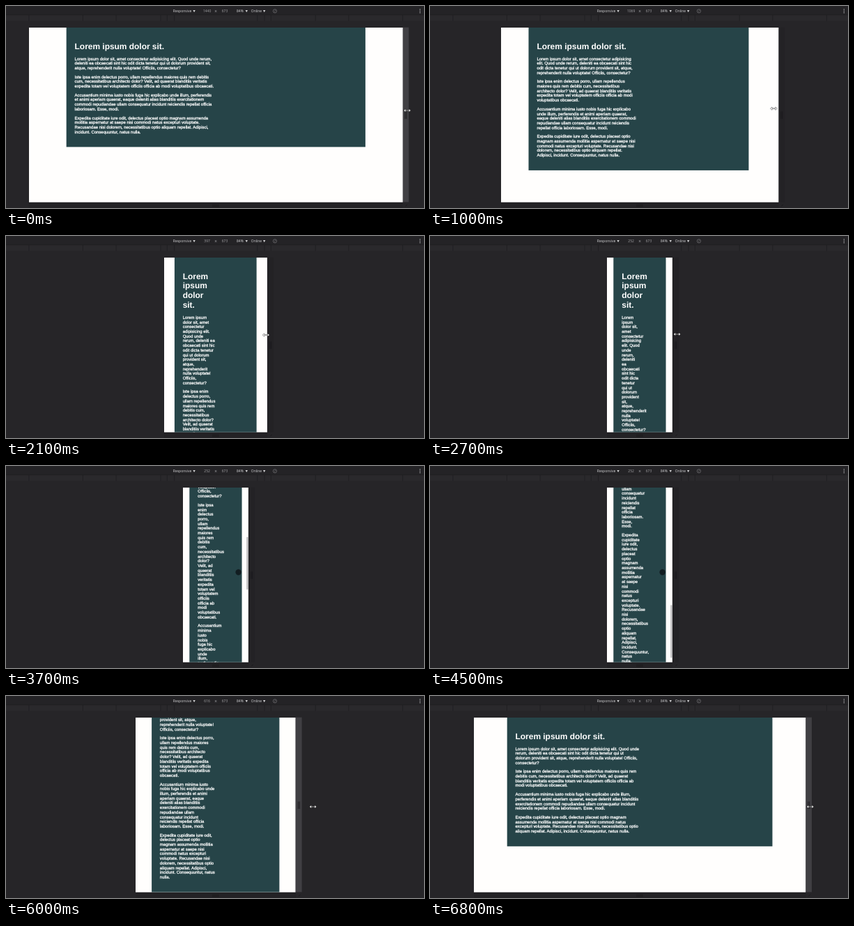
Write an HTML page that moves like this. It is 600 px wide and 290 px high and loops after 6.9 s.

```html
<!DOCTYPE html>
<html lang="en">
<head>
<meta charset="utf-8">
<title>Responsive page preview</title>
<style>
  html, body { margin: 0; width: 100%; height: 100%; overflow: hidden; background: #262528; }
  #stage { position: relative; width: 600px; height: 290px; overflow: hidden; }
  svg { position: absolute; left: 0; top: 0; }
  .bar text { font: 5px "Open Sans", "Noto Sans", sans-serif; fill: #d4d4d6; }
  .bar .dim { fill: #a2a2a5; text-anchor: middle; }
  #page {
    position: absolute; height: 673px; overflow: hidden;
    background: #fffefd; transform-origin: 0 0;
    text-rendering: geometricPrecision;
  }
  #card {
    box-sizing: border-box; padding: 32px;
    background: #264448; color: #fff;
    font: 16px/18px "Liberation Sans", Arial, sans-serif;
  }
  #copy { width: 50%; display: flow-root; }
  h1 { margin: 21.44px 0; font-size: 32px; line-height: 37px; }
  p { margin: 16px 0; -webkit-text-stroke: .7px #fff; }
</style>
</head>
<body>
<div id="stage">
  <svg class="bar" width="600" height="290">
    <rect width="600" height="13" fill="#242326"/>
    <rect y="13" width="600" height="8.5" fill="#2a292c"/>
    <path d="M0 12.8H600" stroke="#1d1c1f" stroke-width=".6"/>
    <path id="ticks" stroke="#1e1d20" stroke-width=".7"/>
    <text x="239.8" y="9.2">Responsive</text>
    <text class="dim" id="size" x="288.6" y="9.2"></text>
    <text class="dim" x="301" y="9.8" style="font-size:6.5px">×</text>
    <text class="dim" x="314" y="9.2">673</text>
    <text x="331" y="9.2">84%</text>
    <text x="351.8" y="9.2">Online</text>
    <path d="M268.4 6h3.4l-1.7 3zM343.6 6h3.4l-1.7 3zM369 6h3.4l-1.7 3z" fill="#d4d4d6"/>
    <g fill="none" stroke="#858588" stroke-width=".6">
      <circle cx="386" cy="7.3" r="2.6"/>
      <path d="M384.8 8.4l2.4-2.2"/>
    </g>
    <path d="M594.3 4.3v1.2m0 1.2v1.2m0 1.2v1.2" stroke="#b5b5b8" stroke-width="1.2"/>
    <rect id="foot" y="281.5" height="8.5" fill="#232225"/>
    <path d="M296 285.6h10m-10 2h10" stroke="#18171a" stroke-width=".8"/>
    <g id="handle">
      <rect id="grab" y="30.7" width="8.7" height="250.8"/>
      <path d="M3.4 151.5v10.5m2 0v-10.5M4 287.5l2.5-2.5" stroke="#18171a" stroke-width=".8"/>
    </g>
  </svg>

  <div id="page">
    <div id="card"><div id="copy">
      <h1>Lorem ipsum dolor sit.</h1>
      <p>Lorem ipsum dolor sit, amet consectetur adipisicing elit. Quod unde rerum, deleniti ea obcaecati sint hic odit dicta tenetur qui ut dolorum provident sit, atque, reprehenderit nulla voluptate! Officiis, consectetur?</p>
      <p>Iste ipsa enim delectus porro, ullam repellendus maiores quis rem debitis cum, necessitatibus architecto dolor? Velit, ad quaerat blanditiis veritatis expedita totam vel voluptatem officiis officia ab modi voluptatibus obcaecati.</p>
      <p>Accusantium minima iusto nobis fuga hic explicabo unde illum, perferendis et animi aperiam quaerat, eaque deleniti alias blanditiis exercitationem commodi repudiandae ullam consequatur incidunt reiciendis repellat officia laboriosam. Esse, modi.</p>
      <p>Expedita cupiditate iure odit, delectus placeat optio magnam assumenda mollitia aspernatur at saepe nisi commodi natus excepturi voluptate. Recusandae nisi dolorem, necessitatibus optio aliquam repellat. Adipisci, incidunt. Consequuntur, natus nulla.</p>
    </div></div>
  </div>

  <svg width="600" height="290">
    <rect id="thumb" x="345.4" width="2.1" rx="1" fill="#6e6e73"/>
    <circle id="touch" r="4.2" fill="#0c1014" fill-opacity=".74"/>
    <path id="arrows" d="M-5 0l2.6-2.2v1.7h4.8v-1.7l2.6 2.2l-2.6 2.2v-1.7h-4.8v1.7z"
          fill="#fff" stroke="#111" stroke-width=".4"/>
  </svg>
</div>

<script>
const LOOP = 6900, STEP = 100;
const SCALE = 0.3726, CENTER = 301.2, TOP = 30.7, VIEW = 673;
const WIDE = 1440, NARROW = 252, REGROWN = 1278;
const CURSOR_LEAD = 110;

const el = id => document.getElementById(id);
const [size, ticks, foot, handle, grab, page, card, thumb, touch, arrows] =
  ['size', 'ticks', 'foot', 'handle', 'grab', 'page', 'card', 'thumb', 'touch', 'arrows'].map(el);

// Eases 0 to 1 between two times; the last two set the speed at each end.
function ease(t, from, to, startSpeed = 0, endSpeed = 0) {
  const u = Math.min(1, Math.max(0, (t - from) / (to - from))), w = 1 - u;
  return u * u * (3 - 2 * u) + startSpeed * u * w * w - endSpeed * u * u * w;
}

const shrink = t => ease(t, 300, 2700, .73);
const widen = t => ease(t, 5300, 6800, 0, .82);
const widthAt = t => WIDE - (WIDE - NARROW) * shrink(t) + (REGROWN - NARROW) * widen(t);
const rightEdge = width => CENTER + width * SCALE / 2;

function layOut(width) {
  card.style.width = width * .8 + 'px';
  card.style.marginLeft = width * .1 + 'px';
  return card.offsetHeight;
}

ticks.setAttribute('d', [320, 375, 425, 768, 1024, 1440]
  .flatMap(w => [-w, w]).map(w => `M${rightEdge(w)} 13v8.5`).join(''));
page.style.top = TOP + 'px';
page.style.transform = `scale(${SCALE})`;
const scrollEnd = layOut(NARROW) - VIEW - 54;

function drawPage(t, width) {
  // While shrinking, the content reflows slightly ahead of its frame.
  const height = layOut(widthAt(t + 20 * (1 - shrink(t))));
  const flicks = .42 * ease(t, 3200, 3700) + .58 * ease(t, 3800, 4500);
  const scroll = Math.min(flicks * scrollEnd, Math.max(0, height - VIEW));
  page.style.width = width + 'px';
  page.style.left = CENTER - width * SCALE / 2 + 'px';
  card.style.transform = `translateY(${-scroll}px)`;
  thumb.setAttribute('y', TOP + scroll / height * VIEW * SCALE);
  thumb.setAttribute('height', VIEW / height * VIEW * SCALE);
  thumb.setAttribute('opacity', .5 * (ease(t, 3200, 3400) - ease(t, 4500, 5000)));
}

function drawFrame(t, width) {
  const right = rightEdge(width);
  size.textContent = width;
  foot.setAttribute('x', 2 * CENTER - right);
  foot.setAttribute('width', width * SCALE);
  handle.setAttribute('transform', `translate(${right} 0)`);
  grab.setAttribute('fill', t < 500 || t > 5200 ? '#403f43' : '#232225');
}

function drawCursor(t, width) {
  const reach = ease(t, 2800, 3300), release = ease(t, 4500, 5200);
  const x = rightEdge(widthAt(t + CURSOR_LEAD)) + 6.5 - 21 * (reach - release);
  const y = 150 - 9 * shrink(t) + 11.5 * reach + 6.5 * release;
  const touching = reach > release && x < rightEdge(width);
  for (const [node, shown] of [[touch, touching], [arrows, !touching]]) {
    node.setAttribute('transform', `translate(${x} ${y})`);
    node.setAttribute('visibility', shown ? 'visible' : 'hidden');
  }
}

let shownAt = -1;
function tick() {
  const t = Math.floor(performance.now() % LOOP / STEP) * STEP;
  if (t !== shownAt) {
    const width = Math.round(widthAt(t));
    for (const draw of [drawPage, drawFrame, drawCursor]) draw(t, width);
    shownAt = t;
  }
  requestAnimationFrame(tick);
}
tick();
</script>
</body>
</html>
```
